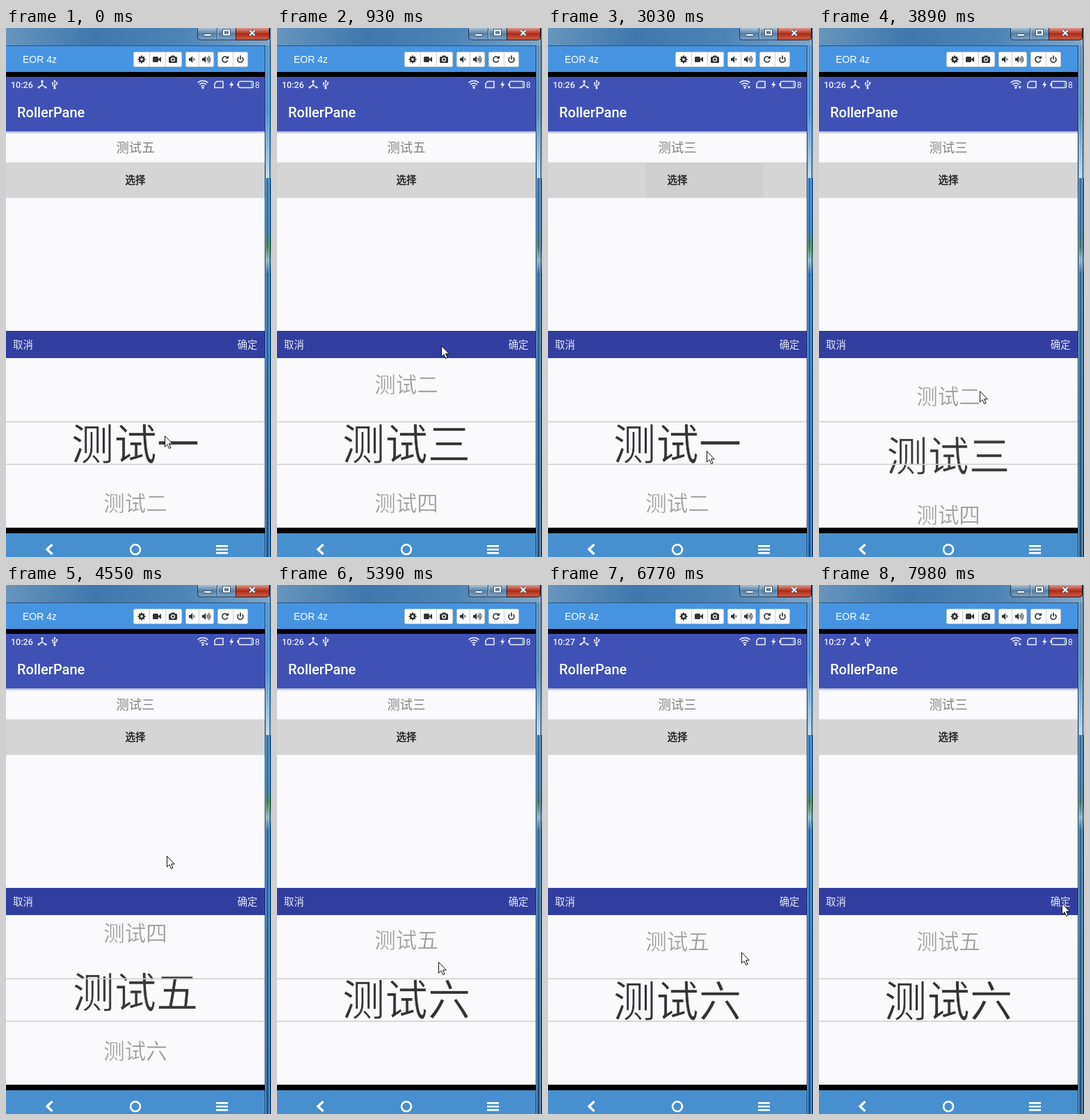
An HTML page with a canvas that plays this animation: 381x758 px, repeating every 8000 ms.

```html
<!DOCTYPE html>
<html lang="zh">
<head>
<meta charset="utf-8">
<title>Wheel picker</title>
<style>
html, body { margin: 0; width: 100%; height: 100%; overflow: hidden; background: #000; }
canvas { display: block; width: 381px; height: 758px; }
</style>
</head>
<body>
<canvas id="stage"></canvas>
<script>
const W = 381, H = 758, LOOP = 8000;
const canvas = document.getElementById('stage');
const ratio = window.devicePixelRatio || 1;
canvas.width = W * ratio;
canvas.height = H * ratio;
const c = canvas.getContext('2d');
c.scale(ratio, ratio);

const CJK = '"Noto Sans CJK SC", "Noto Sans CJK", sans-serif';
const ROBOTO = 'Roboto, sans-serif';
const PAPER = '#fafafc', WHITE = '#eef0fa', INK = '#333';
const ITEMS = [...'一二三四五六'].map(n => '测试' + n);
const ROW = 84.8;

// The screen refreshes once per tick; all times below count ticks.
const TICK = 130;
const CONFIRM = 14, OPEN = 21, MINUTE = 48;

// Pointer stops: tick, x, y
const STOPS = [
  [0, 228, 584], [5, 230, 452], [7, 236, 455], [8, 275, 469], [11, 339, 455], [14, 339, 455],
  [19, 245, 216], [21, 245, 216], [23, 228, 606], [28, 231, 470], [30, 230, 570], [37, 232, 315],
  [40, 232, 542], [41, 232, 540], [43, 275, 625], [46, 238, 572], [49, 242, 616],
  [54, 302, 466], [61, 349, 456]
];
// Press and release of each drag on the wheel
const DRAGS = [[0, 5], [23, 28], [30, 37], [40, 41]];

function pointerAt(tick) {
  const i = STOPS.findIndex(s => s[0] > tick);
  if (i < 0) return STOPS[STOPS.length - 1].slice(1);
  const [t0, x0, y0] = STOPS[i - 1], [t1, x1, y1] = STOPS[i];
  const p = (tick - t0) / (t1 - t0);
  return [x0 + (x1 - x0) * p, y0 + (y1 - y0) * p];
}

// The wheel follows the pointer while pressed, then settles on the nearest row.
function wheelAt(tick) {
  let rest = 0;
  for (const [down, up] of DRAGS) {
    if (tick < down) break;
    if (tick >= OPEN && down < OPEN) continue;
    const moved = pointerAt(down)[1] - pointerAt(Math.min(tick, up))[1];
    const free = rest + moved / ROW;
    rest = Math.round(free);
    const settle = Math.min(1, Math.max(0, (tick - up) / 2));
    if (settle < 1) return free + (rest - free) * settle;
  }
  return rest;
}

function rect(x, y, w, h, fill) {
  c.fillStyle = fill;
  c.fillRect(x, y, w, h);
}

function box(x, y, w, h, r, fill, stroke, width = 1) {
  c.beginPath();
  c.roundRect(x, y, w, h, r);
  if (fill) { c.fillStyle = fill; c.fill(); }
  if (stroke) { c.strokeStyle = stroke; c.lineWidth = width; c.stroke(); }
}

function line(d, color, width) {
  c.strokeStyle = color;
  c.lineWidth = width;
  c.stroke(new Path2D(d));
}

function shape(d, color) {
  c.fillStyle = color;
  c.fill(new Path2D(d));
}

function arc(x, y, r, from, to, color, width) {
  c.beginPath();
  c.arc(x, y, r, from * Math.PI, to * Math.PI);
  c.strokeStyle = color;
  c.lineWidth = width;
  c.stroke();
}

function dot(x, y, r, color) {
  c.beginPath();
  c.arc(x, y, r, 0, 7);
  c.fillStyle = color;
  c.fill();
}

function text(s, x, y, font, color, align = 'left') {
  c.font = font;
  c.fillStyle = color;
  c.textAlign = align;
  c.fillText(s, x, y);
}

// Chinese text placed by the middle of its glyphs, with an optional edge to change its weight
function han(s, x, cy, size, color, align = 'center', edge = null, width = 0) {
  const y = cy + size * 0.38;
  text(s, x, y, `${size}px ${CJK}`, color, align);
  if (!edge) return;
  c.strokeStyle = edge;
  c.lineWidth = width;
  c.lineJoin = 'round';
  c.strokeText(s, x, y);
  c.lineJoin = 'miter';
}

// Evenly spaced colours along a line
function blend(x0, y0, x1, y1, ...colors) {
  const g = c.createLinearGradient(x0, y0, x1, y1);
  colors.forEach((color, i) => g.addColorStop(i / (colors.length - 1), color));
  return g;
}

function windowFrame() {
  rect(0, 0, W, 26, blend(0, 0, W, 26, '#6795bd', '#3f78ad', '#4d84b6', '#7fa8c9'));
  rect(0, 25, 373, 1, '#2b527a');
  rect(372, 25, 9, 190, blend(0, 25, 0, 215, '#5b93c5', '#4a90cc', '#c3dcec'));
  rect(372, 215, 9, H, blend(0, 215, 0, H, '#2f76b8', '#1c5592'));
  rect(372, 290, 9, 65, blend(0, 290, 0, 355, '#2e72b0', '#3f7a48', '#8fbcc4', '#1f62a4'));
  rect(372, 25, 1, H, '#17344f');
  rect(373, 25, 1, H, '#8fc0e6');
  rect(378, 17, 1, H, '#a5cdec');
  rect(379, 0, 1, H, '#14283c');

  box(275.5, -3.5, 103, 20.5, 4, blend(0, 0, 0, 17, '#a9c2d8', '#557fa5', '#7fa6c8'), '#20364c');
  box(330.5, -3.5, 48, 20.5, [0, 0, 4, 0], blend(0, 0, 0, 17, '#dc9a8c', '#ae2b17', '#d0604a'), '#3c1c20');
  rect(303, 0, 1, 16, '#2f4a64');
  rect(304, 0, 1, 16, '#b9d0e2');
  box(284.5, 8.5, 11, 3, 0.5, '#fff', '#45586c');
  for (const [color, width] of [['#45586c', 4], ['#fff', 2]]) {
    line('M313 3.5H321V9.5H313Z', color, width);
    line('M350.5 3.5L357.5 10.5M357.5 3.5L350.5 10.5', color, width);
  }
}

function toolGroup(x, w, ...dividers) {
  box(x + 0.5, 34.5, w - 1, 21, 2, '#fff', '#c4cdd6');
  for (const d of dividers) rect(d, 35, 1, 20, '#ccc');
}

function speaker(x, waves) {
  shape(`M${x} 43h2.2l3-3v10l-3-3h-2.2Z`, INK);
  for (let i = 0; i < waves; i++) arc(x + 5.3, 45, 2.1 * (i + 1), -0.3, 0.3, INK, 1.1);
}

function deviceBar() {
  rect(0, 26, 372, 37, '#4694e1');
  text('EOR 4z', 24, 50, '14px "Liberation Sans", Arial, sans-serif', '#fff');
  toolGroup(183, 70, 206, 229);
  toolGroup(258, 41, 277);
  toolGroup(304, 44, 326);

  arc(195, 45, 3, 0, 2, INK, 2.4);
  for (let i = 0; i < 8; i++) {
    const a = i * Math.PI / 4, x = Math.cos(a), y = Math.sin(a);
    line(`M${195 + 3.5 * x} ${45 + 3.5 * y}L${195 + 5.4 * x} ${45 + 5.4 * y}`, INK, 2);
  }
  box(211, 41, 8, 8, 1.5, INK);
  shape('M219 44.5L223 41V49L219 45.5Z', INK);
  box(234, 41, 12, 9, 1.5, INK);
  rect(237.5, 39.5, 5, 2, INK);
  arc(240, 45.3, 2.4, 0, 2, '#fff', 1.2);
  speaker(263, 1);
  speaker(282, 3);
  arc(315, 45, 4, 0.12, 1.72, INK, 1.7);
  shape('M320 39.5V44H315.5Z', INK);
  arc(337, 45.3, 4, -0.3, 1.3, INK, 1.6);
  line('M337 39.5V45', INK, 1.7);
}

function statusBar(tick) {
  rect(0, 63, 372, 7, '#000');
  rect(0, 70, 372, 78, '#4051b5');
  text(tick >= MINUTE ? '10:27' : '10:26', 7, 85.5, `500 12.5px ${ROBOTO}`, WHITE);

  line('M52 76V81.5L46.5 85.5M52 81.5L57 85.5', WHITE, 1.6);
  dot(52, 76.5, 1.8, WHITE);
  dot(47, 85, 1.6, WHITE);
  dot(57, 85, 1.6, WHITE);
  line('M70 75V87M67 79V82L70 84.5M73 78.5V81L70 83', WHITE, 1.2);
  shape('M68.3 77L70 74L71.7 77Z', WHITE);
  dot(70, 86, 1.6, WHITE);
  dot(67, 79, 1.2, WHITE);
  rect(72, 77.5, 2.2, 2.2, WHITE);

  for (let i = 1; i <= 3; i++) arc(283, 86, 3.5 * i, 1.25, 1.75, WHITE, 1.5);
  dot(283, 85.5, 1.6, WHITE);
  const traffic = tick >= CONFIRM && tick < 39 || tick >= 55;
  if (traffic) shape('M286.5 83.5H291L288.7 87Z', WHITE);
  line('M303 76.5H312V85.5H300V79.5Z', WHITE, 1.5);
  shape('M325.5 75.5L321 82H324L322.5 87L327.5 80H324.5Z', WHITE);
  box(334.5, 76.5, 21, 9, 2, null, WHITE, 1.3);
  rect(332.5, 79, 1.5, 4, WHITE);
  rect(352.3, 78, 2, 6, '#5fc98a');
  text('8', 358, 85.5, `12px ${ROBOTO}`, WHITE);
  text('RollerPane', 16, 128, `500 20px ${ROBOTO}`, '#fff');
}

function page(tick) {
  rect(0, 148, 372, 568, PAPER);
  rect(0, 148, 372, 4, blend(0, 148, 0, 152, '#a9aecb', PAPER));
  han(ITEMS[tick >= CONFIRM ? 2 : 4], 186, 171.5, 18.3, '#808080');
  rect(0, 192.5, 372, 51, '#d5d5d6');
  if (tick >= 19 && tick < 28) rect(141, 193, 169, 50, '#cfcfcf');
  han('选择', 186, 217.5, 14.5, '#222', 'center', '#222', 0.5);
}

function picker(tick) {
  if (tick >= CONFIRM && tick < OPEN) return;
  rect(0, 434, 372, 39, '#323e9f');
  han('取消', 10, 454, 14.4, '#e6e8f5', 'left');
  han('确定', 361.5, 454, 14.4, '#e6e8f5', 'right');
  rect(0, 473, 372, 243, PAPER);

  c.save();
  c.beginPath();
  c.rect(0, 473, 372, 243);
  c.clip();
  const scroll = wheelAt(tick);
  ITEMS.forEach((s, i) => {
    const d = (i - scroll) * ROW;
    const near = Math.max(0, 1 - (d / 60.75) ** 2);
    const size = 30.5 + 31 * near;
    const color = `rgba(51,51,51,${(120 + 135 * near) / 255})`;
    han(s, 186, 595.5 + d, size, color, 'center', PAPER, size * 0.012);
  });
  c.restore();
  for (const y of [563.5, 624.5]) rect(0, y, 372, 1.5, '#cfcfd0');
}

function navBar() {
  rect(0, 716, 372, 8, '#000');
  rect(0, 724, 372, 34, '#478fce');
  line('M66.5 740L59 747L66.5 754', '#fff', 3.4);
  arc(186, 747.3, 7, 0, 2, '#fff', 2.6);
  for (let i = 0; i < 3; i++) rect(302, 741 + 5 * i, 17, 2.6, '#fff');
}

function pointer(tick) {
  const arrow = 'M.5 .5V16L4 12.7L6.6 18.5L9 17.4L6.5 11.8H11.3Z';
  c.save();
  c.translate(...pointerAt(tick).map(Math.round));
  shape(arrow, '#fff');
  line(arrow, '#111', 1);
  c.restore();
}

function draw(now) {
  const tick = Math.floor(now % LOOP / TICK);
  windowFrame();
  deviceBar();
  statusBar(tick);
  page(tick);
  picker(tick);
  navBar();
  pointer(tick);
}

let start;
function play(now) {
  if (start === undefined) start = now;
  draw(now - start);
  requestAnimationFrame(play);
}
draw(0);
requestAnimationFrame(play);
</script>
</body>
</html>
```
